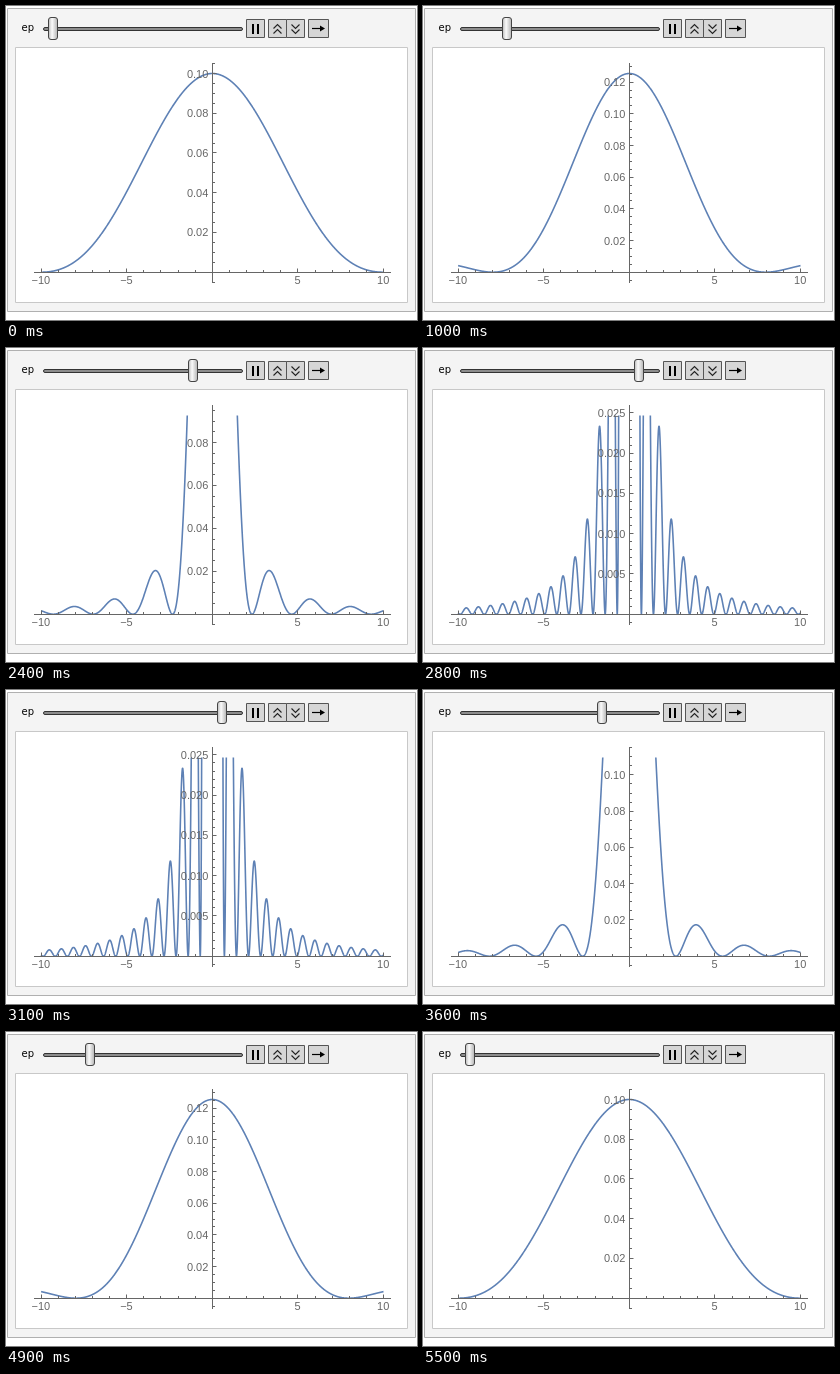
These frames come from a looping animation (411 by 314 pixels, 6 s). An HTML page with a canvas:

```html
<!DOCTYPE html>
<html lang="en">
<head>
<meta charset="utf-8">
<title>Sinc-squared kernel</title>
<style>
  html, body { margin: 0; width: 100%; height: 100%; overflow: hidden; background: #fff; }
  canvas { display: block; }
</style>
</head>
<body>
<canvas id="stage" width="411" height="314"></canvas>
<script>
const canvas = document.getElementById('stage');
const ctx = canvas.getContext('2d');
const LOOP = 6000, LAST = 25;
const ORIGIN_X = 206.3, UNIT_X = 17.12, BASE = 266.2, HEIGHT = 198.7;
const AXIS = '#666', CURVE = '#5e81b5';

// Hold, step down to the narrowest kernel, then step back.
function stepAt(t) {
  if (t < 500) return 0;
  if (t < 3100) return Math.min(LAST, Math.floor((t - 500) / 100) + 1);
  return Math.max(0, LAST - 1 - Math.floor((t - 3100) / 100));
}

const zeroAt = step => Math.min(10, 0.302 + 0.4036 * (LAST - step));

function kernel(x, zero) {
  const u = Math.PI * x / zero;
  return (Math.abs(u) < 1e-6 ? 1 : (Math.sin(u) / u) ** 2) / zero;
}

function tickStep(top) {
  let scale = 10 ** Math.floor(Math.log10(top) - 1);
  for (;; scale *= 10) {
    for (const m of [1, 2, 5]) if (top / (m * scale) <= 7) return { m, size: m * scale };
  }
}

// Vertical range, ticks and the extra room needed by a label at the top edge.
function layout(zero) {
  const clipped = zero < 3;
  const top = clipped ? 0.0247 + (zero - 0.706) * 0.04207 : 1 / zero;
  const { m, size } = tickStep(top);
  const limit = top * (clipped ? 1.03 : 1.062);
  const count = Math.floor(limit / size + 1e-6);
  const highest = BASE - HEIGHT * count * size / top;
  const grow = clipped ? 0 : Math.max(0, Math.round(61.4 - highest));
  return { top, size, count, grow, highest, parts: m === 2 ? 4 : 5 };
}

function line(points, color = AXIS, width = 1) {
  ctx.beginPath();
  points.forEach(([x, y]) => ctx.lineTo(x, y));
  ctx.strokeStyle = color;
  ctx.lineWidth = width;
  ctx.stroke();
}

function box(x, y, w, h, fill, stroke, radius = 0) {
  ctx.beginPath();
  ctx.roundRect(x, y, w, h, radius);
  ctx.fillStyle = fill;
  ctx.fill();
  ctx.strokeStyle = stroke;
  ctx.lineWidth = 1;
  ctx.stroke();
}

const snap = v => Math.floor(v) + 0.5;

function drawSlider(x) {
  ctx.font = '10px "DejaVu Sans", sans-serif';
  ctx.textAlign = 'left';
  ctx.textBaseline = 'alphabetic';
  ctx.fillStyle = '#000';
  ctx.fillText('ep', 15.5, 25);
  box(37.5, 21.5, 199, 3, '#8c8c8c', '#333', 1.5);
  const left = Math.round(x) - 4.5;
  const shade = ctx.createLinearGradient(left, 0, left + 9, 0);
  shade.addColorStop(0, '#bbb');
  shade.addColorStop(0.4, '#fafafa');
  shade.addColorStop(1, '#b4b4b4');
  box(left, 11.5, 9, 22, shade, '#444', 2.5);
}

function drawButtons() {
  for (const [x, w] of [[240.5, 18], [262.5, 18], [280.5, 18], [302.5, 20]]) {
    box(x, 13.5, w, 18, '#d6d6d6', '#555');
  }
  ctx.fillStyle = '#000';
  ctx.fillRect(246, 18, 2, 10);
  ctx.fillRect(251, 18, 2, 10);
  const chevron = (x, y, dy) => line([[x - 4, y + dy], [x, y], [x + 4, y + dy]], '#222', 1.1);
  for (const y of [18.5, 23.5]) chevron(271.5, y, 4);
  for (const y of [22.5, 27.5]) chevron(289.5, y, -4);
  line([[306, 22.5], [316, 22.5]], '#000', 1.2);
  ctx.beginPath();
  ctx.moveTo(319, 22.5);
  ctx.lineTo(314, 19.5);
  ctx.lineTo(314, 25.5);
  ctx.fill();
}

function drawCurve(zero) {
  const { top } = layout(zero);
  ctx.save();
  ctx.beginPath();
  if (top < 1 / zero) ctx.rect(10, BASE - HEIGHT, 391, HEIGHT + 5);
  else ctx.rect(10, 42, 391, 240);
  ctx.clip();
  ctx.lineJoin = 'round';
  const points = [];
  for (let i = -1000; i <= 1000; i++) {
    const x = i / 100;
    points.push([ORIGIN_X + UNIT_X * x, BASE - HEIGHT * kernel(x, zero) / top]);
  }
  line(points, CURVE, 1.6);
  ctx.restore();
}

function drawAxes({ top, size, count, parts, highest }) {
  const axisX = 206.5, axisY = 266.5;
  const upper = Math.min(57, Math.floor(highest));
  line([[28, axisY], [385, axisY]]);
  line([[axisX, upper], [axisX, 277]]);

  ctx.font = '11px "Liberation Sans", Arial, sans-serif';
  ctx.fillStyle = AXIS;
  ctx.textBaseline = 'alphabetic';
  ctx.textAlign = 'center';
  for (let n = -10; n <= 10; n++) {
    if (!n) continue;
    const x = ORIGIN_X + UNIT_X * n, major = n % 5 === 0;
    line([[snap(x), axisY], [snap(x), axisY - (major ? 4 : 2.5)]]);
    if (major) ctx.fillText(String(n).replace('-', '\u2212'), x - 0.3, 278);
  }

  ctx.textAlign = 'right';
  const minor = size / parts;
  const digits = Math.ceil(-Math.log10(size) - 1e-9);
  for (let n = -parts; n <= (count + 1) * parts; n++) {
    const y = BASE - HEIGHT * n * minor / top;
    if (!n || y > 277 || y < upper) continue;
    const major = n > 0 && n % parts === 0;
    line([[axisX, snap(y)], [axisX + (major ? 4 : 2.5), snap(y)]]);
    if (major) ctx.fillText((n * minor).toFixed(digits), 202.3, Math.round(y) + 3.5);
  }
}

function draw(time) {
  const zero = zeroAt(stepAt(time % LOOP));
  const view = layout(zero);
  ctx.fillStyle = '#fff';
  ctx.fillRect(0, 0, 411, 314);
  box(1.5, 2.5, 408, 303 + view.grow, '#f4f4f4', '#b0b0b0');
  box(9.5, 41.5, 392, 255 + view.grow, '#fff', '#c8c8c8');
  drawSlider(47 + (10 - zero) * 18.18);
  drawButtons();
  ctx.save();
  ctx.translate(0, view.grow);
  drawCurve(zero);
  drawAxes(view);
  ctx.restore();
}

const start = performance.now();
function tick() {
  draw(performance.now() - start);
  requestAnimationFrame(tick);
}
tick();
</script>
</body>
</html>
```
